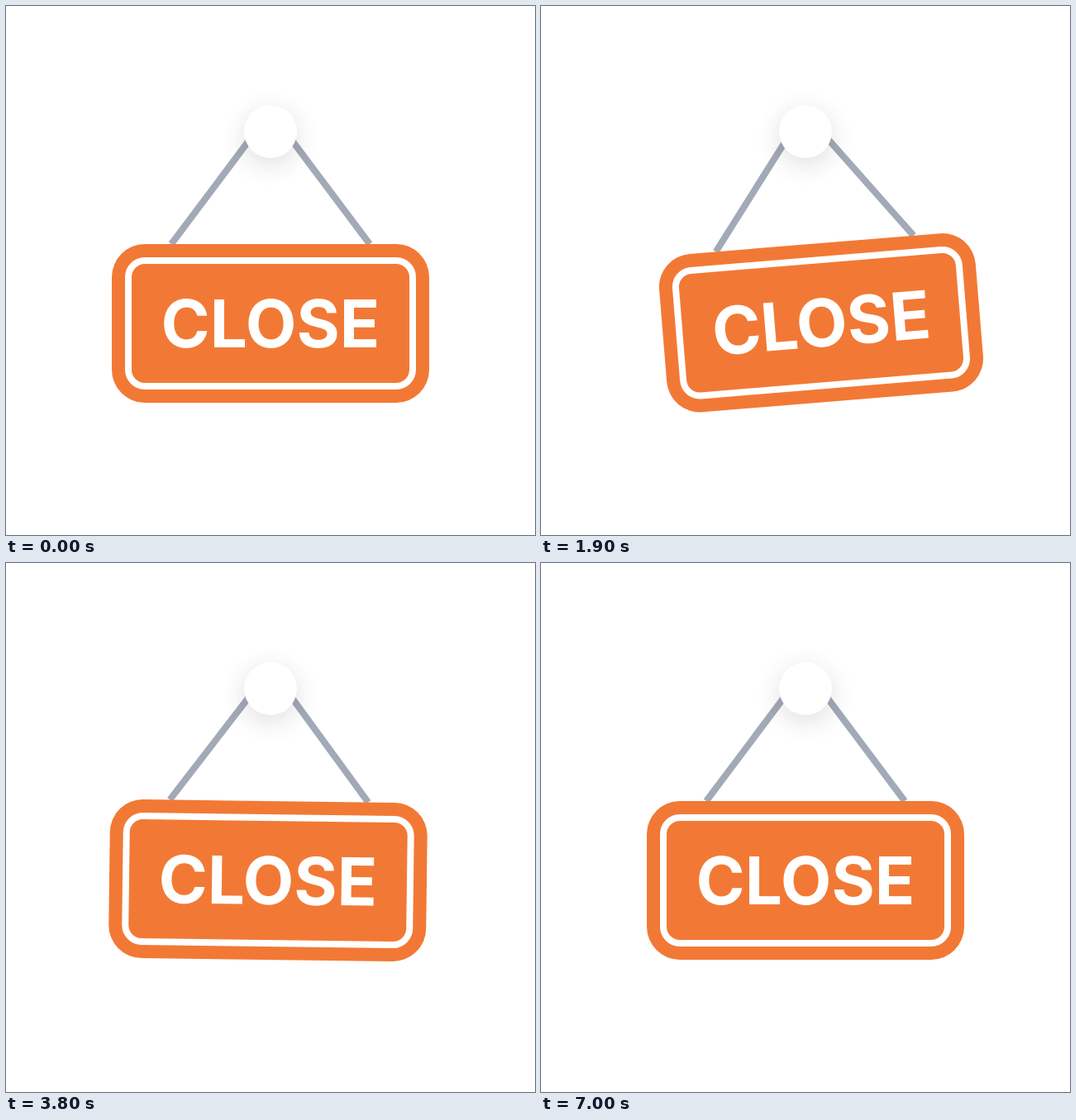
These frames come from a looping animation (640x640 px, 8.4 s). An HTML page:

```html
<!DOCTYPE html>
<html lang="en">
<head>
<meta charset="utf-8">
<title>Swinging sign</title>
<style>
  html, body { margin: 0; width: 100%; height: 100%; overflow: hidden; background: #fff; }
  svg { display: block; width: 100%; height: 100%; }
  .rope { fill: none; stroke: #a2a9b7; stroke-width: 8; }
  .board { fill: #f27935; }
  .ring { fill: none; stroke: #fff; stroke-width: 8; }
  .label { font: 700 80px Inter, "Liberation Sans", sans-serif; fill: #fff; text-anchor: middle; }
  .shadow { opacity: .13; filter: blur(16px); }
</style>
</head>
<body>
<svg viewBox="0 0 640 640">
  <g id="sign">
    <path class="rope" d="M200 288 L320 128 L440 288"/>
    <rect class="board" x="128" y="288" width="384" height="192" rx="40"/>
    <rect class="ring" x="148" y="308" width="344" height="152" rx="20"/>
    <text class="label" x="320" y="413">CLOSE</text>
  </g>
  <g id="knob">
    <circle class="shadow" cx="320" cy="160" r="32"/>
    <circle cx="320" cy="152" r="32" fill="#fff"/>
  </g>
</svg>
<script>
  const LOOP = 8400, STEP = 100;

  // [time in ms, value] at each turning point
  const angles = [
    [300, 0], [500, -14.5], [850, 12.2], [1210, -12.1], [1600, 9.6],
    [2020, -8], [2430, 5.9], [2840, -5], [3230, 3.95], [3550, -3.9],
    [3915, 2.1], [4380, -2], [4790, 1.75], [5280, -1], [5750, 1.1],
    [6200, -0.15], [6600, 0.3], [7000, 0]
  ];
  const shifts = [[300, 0], [560, -3], [1000, 7], [1200, 0]];

  const sign = document.getElementById("sign");
  const knob = document.getElementById("knob");

  // Half a cosine wave between neighbouring turning points
  function valueAt(keys, t) {
    if (t <= keys[0][0]) return keys[0][1];
    const i = keys.findIndex(key => key[0] >= t);
    if (i < 0) return keys[keys.length - 1][1];
    const [t0, a] = keys[i - 1], [t1, b] = keys[i];
    const p = (t - t0) / (t1 - t0);
    return a + (b - a) * (1 - Math.cos(Math.PI * p)) / 2;
  }

  function draw(ms) {
    const t = Math.floor((ms % LOOP) / STEP) * STEP;
    const x = valueAt(shifts, t);
    const move = `translate(${x} 0)`;
    knob.setAttribute("transform", move);
    sign.setAttribute("transform", `${move} rotate(${valueAt(angles, t)} 320 152)`);
  }

  const start = performance.now();
  function tick() {
    draw(performance.now() - start);
    requestAnimationFrame(tick);
  }
  tick();
</script>
</body>
</html>
```
